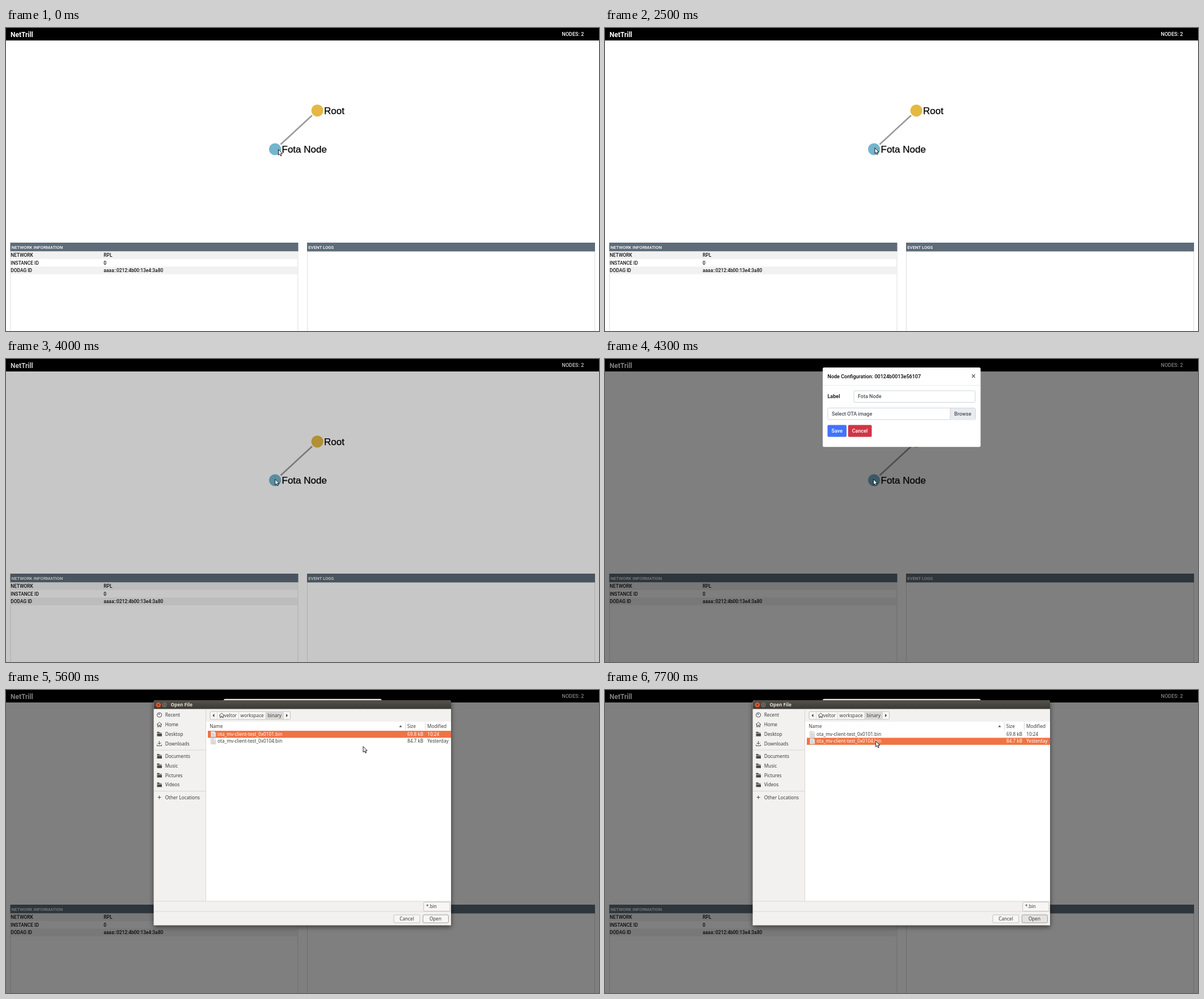
An HTML page that plays this animation: 1046x535 px, repeating every 8000 ms.

```html
<!DOCTYPE html>
<html lang="en">
<head>
<meta charset="utf-8">
<title>Mesh network monitor</title>
<style>
html, body { margin: 0; width: 100%; height: 100%; overflow: hidden; background: #fff; }
svg { display: block; width: 100%; height: 100%; }
text { font: 500 9px Roboto, sans-serif; white-space: pre; }
.brand { font-weight: 700; font-size: 12px; }
.node { font: 17px "Liberation Sans", Arial, sans-serif; stroke: #000; stroke-width: .25; }
.head { font-size: 7.8px; fill: #fff; }
.cell { font-size: 8.4px; fill: #111; }
.tip text { font-size: 6.72px; fill: #fff; }
.tip tspan { font-size: 6.5px; font-weight: 700; }
.field { fill: #fff; stroke: #ced4da; }
.muted { fill: #495057; }
.white { fill: #fff; }
#files { filter: drop-shadow(0 3px 4px rgba(0, 0, 0, .55)); }
#files text { font: 8.2px "Noto Sans", sans-serif; fill: #3c3c3c; }
#files .title { font-weight: 700; fill: #dfdbd2; }
.button { fill: #f7f6f5; stroke: #b8b4ae; stroke-width: .8; }
.rule { stroke: #d3d0cc; stroke-width: .8; fill: none; }
.icon { fill: none; stroke: #4a4a4a; stroke-width: 1; }
.solid { fill: #4a4a4a; }
.row rect { fill: none; }
.row.selected rect { fill: #f07343; }
#files .row.selected text { fill: #fff; }
</style>
</head>
<body>
<svg viewBox="0 0 1046 535">
  <defs>
    <linearGradient id="bar" x2="0" y2="1">
      <stop stop-color="#55524b"/><stop offset="1" stop-color="#3b3934"/>
    </linearGradient>
  </defs>
  <rect width="1046" height="535" fill="#fff"/>
  <rect width="1046" height="22" fill="#000"/>
  <text class="brand white" x="8" y="15.5">NetTrill</text>
  <text class="white" x="980.5" y="13.5">NODES: 2</text>

  <path d="M540 154.3L484.5 205.5" stroke="#999" stroke-width="2.6"/>
  <circle cx="549.2" cy="145.8" r="10.6" fill="#e4b843"/>
  <circle cx="474.6" cy="214" r="10.6" fill="#74b4cd"/>
  <text class="node" x="561" y="152">Root</text>
  <text class="node" x="486.5" y="220">Fota Node</text>

  <g id="panels"></g>
  <g id="tooltip" class="tip">
    <path d="M305.5 127.5H466a3 3 0 0 1 3 3V210l3 3-3 3V294.500a3 3 0 0 1-3 3H305.500a3 3 0 0 1-3-3V130.500a3 3 0 0 1 3-3z" fill="#000" fill-opacity=".47"/>
  </g>
  <rect id="shade" width="1046" height="535"/>

  <g id="modal">
    <rect x="384" y="15" width="278.500" height="140.300" rx="2.500" fill="#fff"/>
    <path d="M384 46.500H662.500" stroke="#e9ecef"/>
    <text x="392.500" y="33.500">Node Configuration: 00124b0013e56107</text>
    <text x="650" y="34.700" text-anchor="middle" style="font-size:14px;font-weight:700" fill="#777">×</text>
    <text x="392.500" y="69.300">Label</text>
    <rect class="field" x="439" y="56" width="214" height="20.500" rx="2"/>
    <text class="muted" x="446" y="69.300">Fota Node</text>
    <rect class="field" x="393" y="86.500" width="260.500" height="20.500" rx="2"/>
    <path d="M609 87H651.500a1.500 1.500 0 0 1 1.500 1.500V105a1.500 1.500 0 0 1-1.500 1.500H609z" fill="#e9ecef"/>
    <path d="M609 86.500V107" stroke="#ced4da"/>
    <text class="muted" x="400" y="99.700">Select OTA image</text>
    <text class="muted" x="616" y="99.700">Browse</text>
    <rect x="392.500" y="116.500" width="33.500" height="21" rx="2" fill="#4273fc"/>
    <text class="white" x="399.500" y="130">Save</text>
    <rect x="428.800" y="116.500" width="41.700" height="21" rx="2" fill="#d03545"/>
    <text class="white" x="435.700" y="130">Cancel</text>
  </g>

  <g id="files">
    <path d="M260.500 415.500V22a4 4 0 0 1 4-4H781a4 4 0 0 1 4 4V415.500z" fill="#f2f1f0"/>
    <path d="M260.500 33.500V22a4 4 0 0 1 4-4H781a4 4 0 0 1 4 4V33.500z" fill="url(#bar)"/>
    <circle cx="268.700" cy="26.200" r="4.300" fill="#e8582c"/>
    <path d="M267 24.500l3.400 3.400m0-3.400l-3.400 3.400" stroke="#4b2a1c"/>
    <circle cx="279.500" cy="26.200" r="4" fill="#77746c"/>
    <rect x="277.800" y="24.500" width="3.400" height="3.400" fill="none" stroke="#3b3934" stroke-width=".8"/>
    <text class="title" x="290.500" y="29.300">Open File</text>
    <rect x="353" y="56" width="432" height="317" fill="#fff"/>
    <path class="rule" d="M352.500 33.500V373M261 373H785M261 391H785M261 106H352M261 178.500H352M704.500 57V71M739.500 57V71"/>
    <g id="places"></g>

    <rect class="button" x="360" y="38" width="141.500" height="14" rx="2"/>
    <rect x="458" y="38.400" width="31.500" height="13.200" fill="#dbd9d7"/>
    <path class="rule" d="M372.500 38V52M410.500 38V52M458 38V52M489.500 38V52"/>
    <path class="solid" d="M367.500 42v6l-3.200-3zM494 42v6l3.200-3zM693.500 65.500h5l-2.500-3.200zM772.500 381.200h6l-3 3.300z"/>
    <path class="icon" d="M376 45l4.500-4.200 4.500 4.200M377.500 44.500v4.200h2v-2.500h2v2.500h2v-4.200"/>
    <text x="384.800" y="47.800">veltor</text>
    <text x="413.500" y="47.800">workspace</text>
    <text x="461.500" y="47.800">binary</text>

    <text x="359.300" y="67">Name</text>
    <text x="707.700" y="67">Size</text>
    <text x="743" y="67">Modified</text>
    <g id="rows"></g>

    <rect class="button" x="736.700" y="374.500" width="46.500" height="16" rx="2"/>
    <text x="741" y="385.300">*.bin</text>
    <rect class="button" x="684" y="397" width="46" height="14" rx="2"/>
    <text x="707" y="406.800" text-anchor="middle">Cancel</text>
    <rect id="open" class="button" x="735.500" y="397" width="45" height="14" rx="2" style="stroke:#8f8b85"/>
    <text x="757.500" y="406.800" text-anchor="middle">Open</text>
  </g>

  <path id="cursor" d="M0 0V10L2.300 7.900 3.900 11.500 5.600 10.800 4.100 7.300H7.200z" fill="#fff" stroke="#000" stroke-width=".9" stroke-linejoin="round"/>
</svg>
<script>
const LOOP = 8000;
const $ = id => document.getElementById(id);
const text = (x, y, label, cls = '') => `<text class="${cls}" x="${x}" y="${y}">${label}</text>`;

// Information panels
const panel = (x, title) =>
  `<path d="M${x} 394V536M${x + 507} 394V536" stroke="#ddd"/>
   <rect x="${x - .5}" y="379" width="508" height="15.500" fill="#5d6c78"/>` +
  text(x + 1.7, 389.6, title, 'head');

const info = [['NETWORK', 'RPL'], ['INSTANCE ID', '0'], ['DODAG ID', 'aaaa::0212:4b00:13e4:3a80']];
$('panels').innerHTML = panel(8, 'NETWORK INFORMATION') + panel(531.5, 'EVENT LOGS') +
  info.map(([key, value], i) => {
    const y = 394.5 + i * 13.4;
    const stripe = i % 2 ? '' : `<rect x="8.500" y="${y}" width="506" height="13.400" fill="#f1f1f1"/>`;
    return stripe + text(8.3, y + 9.6, key, 'cell') + text(172.3, y + 9.6, value, 'cell');
  }).join('');

// Node details
const details = `NETWORK: RPL
NODE TYPE: ROUTER
ID: 00124b0013e56107
LINK-LOCAL IP: fe80::0212:4b00:13e5:6107
GLOBAL IP: aaaa::0212:4b00:13e5:6107
PARENT ID: 00124b0013e43a80
PARENT LINK-LOCAL IP: fe80::0212:4b00:13e4:3a80
PARENT GLOBAL IP: aaaa::0212:4b00:13e4:3a80
RANK: 345
DODAG ID: aaaa::0212:4b00:13e4:3a80
DAG VERSION: 240
CHANNEL: 0
PAN ID: 0xabcd
TX POWER: 13 dBm
FIRMWARE VERSION: 1.4
LAST HEARD: 236 seconds ago`;
$('tooltip').innerHTML += details.split('\n').map((line, i) =>
  text(306.7, 139.3 + i * 10.07, line.replace(/^[^:]+:/, '<tspan>$&</tspan>'))).join('');

// File dialog
const folder = '<path class="solid" d="M-4-4h3.500l1 1.500H4V-1.500H-4z"/><path class="solid" d="M-4-.7H4.500V4H-4z"/>';
const icons = {
  Recent: '<circle class="icon" r="4"/><path class="icon" d="M-2-2L0 0V-2.500"/>',
  Home: '<path class="icon" d="M-4.500 0L0-4 4.500 0M-3-1V4H-1V1H1V4H3V-1"/>',
  Downloads: '<path class="icon" d="M0-4.500V1.500M-3-1.500L0 1.500 3-1.500M-4 2V4H4V2"/>',
  'Other Locations': '<path class="icon" d="M-3 0H3M0-3V3"/>'
};
const places = [['Recent', 44], ['Home', 61], ['Desktop', 77.7], ['Downloads', 94.5], ['Documents', 117],
  ['Music', 133.8], ['Pictures', 150.5], ['Videos', 167.3], ['Other Locations', 189.5]];
$('places').innerHTML = places.map(([name, y]) =>
  `<g transform="translate(270.500 ${y})">${icons[name] || folder}</g>` + text(280.7, y + 3, name)).join('');

const files = [['ota_mv-client-test_0x0101.bin', '69.8 kB', '10:24'],
  ['ota_mv-client-test_0x0104.bin', '84.7 kB', 'Yesterday']];
$('rows').innerHTML = files.map(([name, size, date], i) => {
  const y = 72 + i * 12.4;
  return `<g class="row"><rect x="356" y="${y}" width="429" height="12.400"/>
    <path d="M361.500 ${y + 1}h6l2.500 2.500v7.500h-8.500z" fill="#eee" stroke="#bbb" stroke-width=".7"/>
    <path d="M363 ${y + 4}h4m-4 2.500h5.500m-5.500 2.500h5.500" stroke="#aaa" stroke-width=".8"/>` +
    text(373, y + 8.9, name) + text(708, y + 8.9, size) + text(743.3, y + 8.9, date) + '</g>';
}).join('');
const rows = document.querySelectorAll('.row');

// Pointer stops: time, x, y
const stops = [[0, 480.5, 214.5], [200, 476, 211.7], [3300, 483.5, 213.7], [3600, 474.7, 212.3],
  [4300, 473.5, 212.3], [4700, 480.5, 127], [5000, 590, 104.5], [5600, 630, 99.7], [5900, 563.7, 114.3],
  [6300, 491.5, 94.5], [6600, 481.5, 89.5], [6900, 478.5, 83.7], [7400, 477.7, 90.3]];

const show = (id, on) => { $(id).style.display = on ? '' : 'none'; };

function draw() {
  const t = performance.now() % LOOP;
  const [, x, y] = stops.filter(stop => stop[0] <= t).pop();
  $('cursor').setAttribute('transform', `translate(${x} ${y})`);
  show('tooltip', t >= 700 && t < 2500);
  $('shade').setAttribute('opacity', t < 4000 ? 0 : t < 4300 ? .22 : .5);
  show('modal', t >= 4300);
  $('modal').setAttribute('transform', `translate(0 ${t < 4700 ? 0 : .7})`);
  show('files', t >= 5600);
  const second = t >= 7700;
  rows[0].classList.toggle('selected', !second);
  rows[1].classList.toggle('selected', second);
  $('open').style.fill = second ? '#e6e4e2' : '';
  requestAnimationFrame(draw);
}
draw();
</script>
</body>
</html>
```
